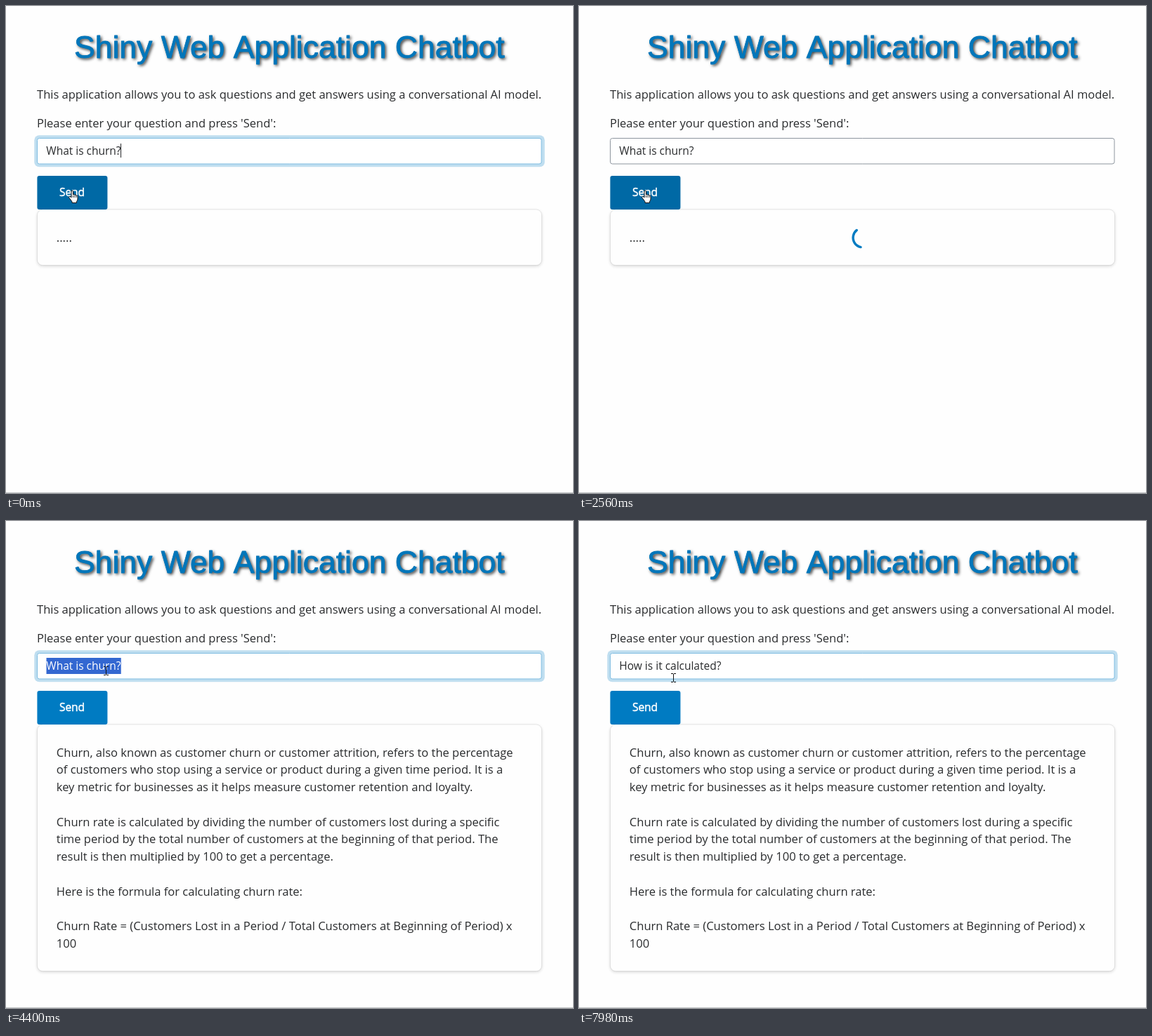
Recreate the animation shown at these times as an HTML page with a canvas. Size 807 by 694 pixels, loop 8 s.

```html
<!DOCTYPE html>
<html lang="en">
<head>
<meta charset="utf-8">
<title>Chatbot</title>
<style>
html, body { margin: 0; width: 100%; height: 100%; overflow: hidden; background: #fefefe; }
canvas { display: block; }
</style>
</head>
<body>
<canvas id="stage" width="807" height="694"></canvas>
<script>
const ctx = document.getElementById('stage').getContext('2d');
const LOOP = 8000;
const ANSWER_AT = 2820;
const INK = '#292b2d';
const SANS = '"Open Sans", sans-serif';
const BODY = `16.5px ${SANS}`;
const REPLY = `16.54px ${SANS}`;
const FIELD = `15.5px ${SANS}`;
const TEXT_X = 57.3;

const ANSWER = [
  'Churn, also known as customer churn or customer attrition, refers to the percentage',
  'of customers who stop using a service or product during a given time period. It is a',
  'key metric for businesses as it helps measure customer retention and loyalty.',
  '',
  'Churn rate is calculated by dividing the number of customers lost during a specific',
  'time period by the total number of customers at the beginning of that period. The',
  'result is then multiplied by 100 to get a percentage.',
  '',
  'Here is the formula for calculating churn rate:',
  '',
  'Churn Rate = (Customers Lost in a Period / Total Customers at Beginning of Period) x',
  '100'
];
const FIRST = 'What is churn?';
const SECOND = 'How is it calculated?';

// Each track is a list of [start time, value...]; values hold until the next entry.
const FOCUS = [[0, 1], [140, 0.4], [270, 0], [4010, 0.25], [4150, 1]];
const HOVER = [[0, 1], [3610, 0.7], [3750, 0.1], [3870, 0]];
const SPINNER = [[0, 0], [1240, 0.3], [1370, 0.7], [1500, 1], [ANSWER_AT, 0]];
const TYPED = [
  [4930, 1], [5060, 2], [5190, 3], [5320, 4], [5450, 6], [5580, 7], [5730, 8],
  [5860, 9], [5990, 10], [6130, 11], [6260, 12], [6390, 14], [6520, 15],
  [6780, 17], [7050, 19], [7180, 20], [7320, 21]
];
const POINTER = [
  [0, 'hand', 89, 262], [3470, 'hand', 127, 243], [3610, 'arrow', 138, 229],
  [3750, 'beam', 142, 207], [7850, 'beam', 138, 213], [7980, 'beam', 134, 217]
];

function at(track, t) {
  let hit = track[0];
  for (const key of track) if (t >= key[0]) hit = key;
  return hit.slice(1);
}

function mix(a, b, k) {
  return `rgb(${a.map((v, i) => Math.round(v + (b[i] - v) * k)).join(',')})`;
}

function text(str, x, y, font = BODY, color = INK) {
  ctx.font = font;
  ctx.fillStyle = color;
  ctx.fillText(str, x, y);
}

// Medium weight: a regular face thickened by a fine outline.
function mediumText(str, x, y, font, color, weight) {
  ctx.font = font;
  ctx.strokeStyle = color;
  ctx.lineWidth = weight;
  ctx.lineJoin = 'round';
  ctx.strokeText(str, x, y);
  ctx.shadowColor = 'transparent';
  text(str, x, y, font, color);
}

function box(x, y, w, h, r, fill) {
  ctx.beginPath();
  ctx.roundRect(x, y, w, h, r);
  if (fill) {
    ctx.fillStyle = fill;
    ctx.fill();
  }
}

function outline(color, width = 1) {
  ctx.strokeStyle = color;
  ctx.lineWidth = width;
  ctx.stroke();
}

function drawTitle() {
  const font = '44.5px "Liberation Sans", Arial, sans-serif';
  ctx.save();
  ctx.shadowColor = 'rgba(0,0,0,0.9)';
  ctx.shadowBlur = 4;
  ctx.shadowOffsetX = ctx.shadowOffsetY = 2;
  text('Shiny Web Application Chatbot', 97, 74, font, '#0076ba');
  ctx.shadowColor = 'transparent';
  mediumText('Shiny Web Application Chatbot', 97, 74, font, '#0076ba', 0.8);
  ctx.restore();
}

function drawField(t) {
  const [focus] = at(FOCUS, t);
  if (focus > 0) {
    const ring = 3.9 * focus;
    box(44.2 - ring, 188.2 - ring, 718.6 + 2 * ring, 37.2 + 2 * ring, 3 + ring,
      `rgba(0,123,194,${0.25 * focus})`);
  }
  box(44.5, 188.5, 717.5, 36.5, 3, '#fff');
  outline(mix([141, 149, 158], [128, 189, 225], Math.sqrt(focus)));

  const value = t < 4930 ? FIRST : SECOND.slice(0, at(TYPED, t)[0]);
  const selected = t >= 4400 && t < 4930;
  ctx.font = FIELD;
  const width = ctx.measureText(value).width;
  if (selected) {
    ctx.fillStyle = '#3367d1';
    ctx.fillRect(57.5, 195, width, 23);
  }
  text(value, TEXT_X, 212, FIELD, selected ? '#fff' : INK);

  ctx.fillStyle = INK;
  if (t < 140 || (t >= 4930 && t < 7850)) {
    ctx.fillRect(Math.floor(TEXT_X + width), 196, 1, 20);
  } else if (t >= 4010 && t < 4400) {
    ctx.fillRect(141, 196, 1, 20);
  }
}

function drawCard(t) {
  const done = t >= ANSWER_AT;
  ctx.save();
  ctx.shadowColor = 'rgba(0,0,0,0.16)';
  ctx.shadowBlur = 4;
  ctx.shadowOffsetY = 1.5;
  box(44.5, 290, 718, done ? 351.5 : 79.5, 8, '#fefefe');
  ctx.restore();
  outline('rgba(0,0,0,0.09)');
  if (done) ANSWER.forEach((line, i) => text(line, 71.8, Math.round(335.6 + i * 24.75), REPLY));
  else text('.....', 71.8, 336, REPLY);
}

function drawSpinner(t) {
  const [alpha] = at(SPINNER, t);
  if (!alpha) return;
  const step = Math.floor((t - 1640) / 130);
  const mid = t < 1640 ? -45 : 90 + step * 130 * 360 / 750;
  const rad = Math.PI / 180;
  ctx.save();
  ctx.globalAlpha = alpha;
  ctx.lineCap = 'round';
  ctx.beginPath();
  ctx.arc(403.8, 330.2, 13.7, (mid - 65) * rad, (mid + 65) * rad);
  outline('#007bc2', 3.4);
  ctx.restore();
}

function drawButton(t) {
  const [hover] = at(HOVER, t);
  const pressed = t >= 140 && t < 270;
  box(44.4, 242, 100, 48, 3, pressed ? '#00629b' : mix([0, 123, 194], [0, 105, 165], hover));
  mediumText('Send', 75.9, 271, FIELD, '#fff', 0.5);
}

const SHAPES = {
  hand: 'M4 1.5Q5.3.3 6.5 1.5V7Q8 6 9 7.3Q10.4 6.6 11.2 8Q13 7.6 13 9.5V13' +
    'Q13 15 11.5 16.5V18.5H5V16.8L1 11.5Q0 9.8 1.5 9.4Q2.7 9.3 4 11Z',
  arrow: 'M.5.5V16L4.2 12.6L6.7 18.3L9 17.3L6.6 11.8H11.6Z'
};
const PATHS = Object.fromEntries(Object.entries(SHAPES).map(([k, d]) => [k, new Path2D(d)]));

function drawPointer(t) {
  const [kind, x, y] = at(POINTER, t);
  ctx.save();
  ctx.translate(x, y);
  if (kind === 'beam') {
    ctx.fillStyle = '#111';
    ctx.fillRect(0, 1, 1, 11);
    for (const row of [0, 12]) {
      ctx.fillRect(-3, row, 3, 1);
      ctx.fillRect(1, row, 3, 1);
    }
  } else {
    ctx.fillStyle = '#fff';
    ctx.fill(PATHS[kind]);
    ctx.strokeStyle = '#111';
    ctx.lineWidth = 1;
    ctx.stroke(PATHS[kind]);
    if (kind === 'hand') {
      ctx.fillStyle = '#111';
      for (const gap of [6.2, 8.4, 10.6]) ctx.fillRect(gap, 8, 0.8, 3);
    }
  }
  ctx.restore();
}

function draw(t) {
  ctx.fillStyle = '#fefefe';
  ctx.fillRect(0, 0, 807, 694);
  ctx.fillStyle = '#c4c6c8';
  ctx.fillRect(0, 693, 807, 1);
  drawTitle();
  text('This application allows you to ask questions and get answers using a conversational AI model.', 44, 132);
  text("Please enter your question and press 'Send':", 44, 173);
  drawField(t);
  drawCard(t);
  drawSpinner(t);
  drawButton(t);
  drawPointer(t);
}

const start = performance.now();
function tick() {
  draw((performance.now() - start) % LOOP);
  requestAnimationFrame(tick);
}
tick();
</script>
</body>
</html>
```
